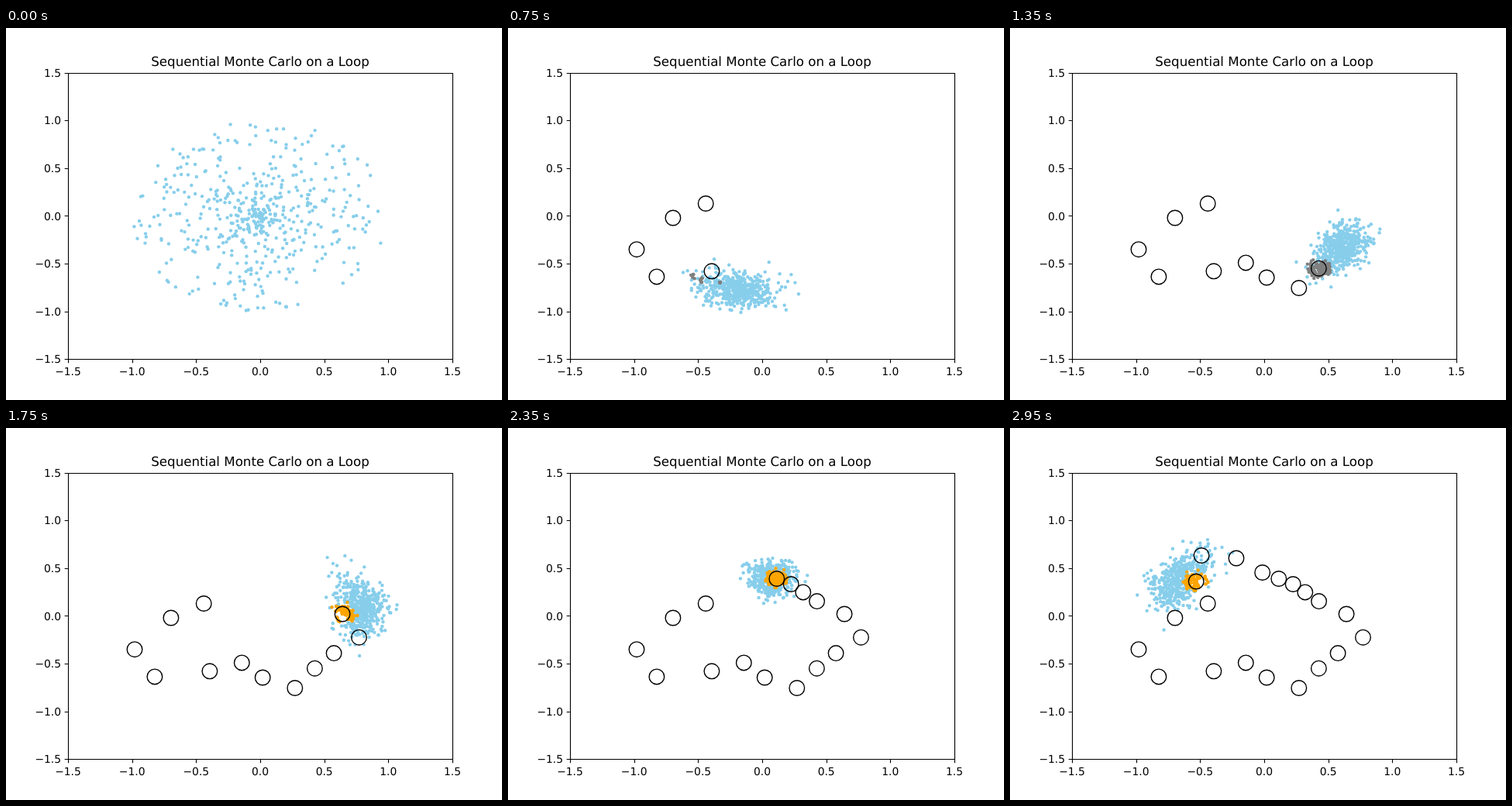
An HTML page with a canvas for the animation above (3000 ms loop, 640 px wide and 480 px high).

```html
<!DOCTYPE html>
<html lang="en">
<head>
<meta charset="utf-8">
<title>Sequential Monte Carlo on a Loop</title>
<style>
  html, body { margin: 0; width: 100%; height: 100%; overflow: hidden; background: #fff; }
  canvas, svg { position: absolute; left: 0; top: 0; width: 640px; height: 480px; }
  text {
    font-family: "DejaVu Sans", Verdana, sans-serif; font-size: 13.89px; fill: #000;
    text-rendering: geometricPrecision;
  }
  .title { font-size: 16.67px; }
  path { stroke: #000; stroke-width: 1.11; fill: none; }
</style>
</head>
<body>
<canvas id="plot" width="640" height="480"></canvas>
<svg id="axes" viewBox="0 0 640 480"></svg>
<script>
const FRAME_MS = 50, SUBFRAMES = 3, COUNT = 500;
const TURN = Math.PI / 8, ANGLE_NOISE = 0.2, RADIUS_NOISE = 0.088, SIGHT = 0.032;
const X0 = 328, Y0 = 242.4, SX = 496 / 3, SY = 369.6 / 3;

const toX = x => X0 + x * SX;
const toY = y => Y0 - y * SY;

// Observed positions along the loop, in pixels
const circles = [
  [255.2, 226.5], [212.9, 245], [166, 285.7], [191.9, 320.9], [262.9, 313.8],
  [304.3, 302.9], [331.2, 322], [372.8, 335.5], [398.4, 310.2], [423.1, 290.6],
  [455.5, 270.2], [434.1, 240], [398.6, 223.6], [380.8, 211.9], [365.2, 201.5],
  [346.8, 194.5], [325.7, 186.5], [292, 168], [247.1, 164.5], [240.2, 198]
];

let seed = 20471;
function random() {
  seed = (seed + 0x6D2B79F5) | 0;
  let v = Math.imul(seed ^ (seed >>> 15), 1 | seed);
  v = (v + Math.imul(v ^ (v >>> 7), 61 | v)) ^ v;
  return ((v ^ (v >>> 14)) >>> 0) / 4294967296;
}

function normal() {
  return Math.sqrt(-2 * Math.log(1 - random())) * Math.cos(2 * Math.PI * random());
}

const polar = (r, a) => [r * Math.cos(a), r * Math.sin(a)];

function predict([x, y]) {
  return polar(
    Math.hypot(x, y) + RADIUS_NOISE * normal(),
    Math.atan2(y, x) + TURN + ANGLE_NOISE * normal()
  );
}

// Systematic resampling weighted by closeness to the observation
function resample(points, [px, py]) {
  const ox = (px - X0) / SX, oy = (Y0 - py) / SY;
  const weights = points.map(([x, y]) =>
    Math.exp(-((x - ox) ** 2 + (y - oy) ** 2) / (2 * SIGHT * SIGHT)));
  const total = weights.reduce((a, b) => a + b, 0);
  const picked = [], offset = random();
  let i = 0, sum = weights[0];
  for (let n = 0; n < COUNT; n++) {
    const goal = (n + offset) / COUNT * total;
    while (sum < goal && i < COUNT - 1) sum += weights[++i];
    picked.push(points[i]);
  }
  return picked;
}

const clouds = [], chosen = [];
let cloud = Array.from({ length: COUNT }, () => polar(random(), 2 * Math.PI * random()));
for (const c of circles) {
  clouds.push(cloud);
  const kept = resample(cloud, c);
  chosen.push(kept);
  cloud = kept.map(predict);
}

const ctx = document.getElementById("plot").getContext("2d");

function dots(points, color) {
  ctx.fillStyle = color;
  for (const [x, y] of points) {
    ctx.beginPath();
    ctx.arc(toX(x), toY(y), 2.2, 0, 2 * Math.PI);
    ctx.fill();
  }
}

function draw(frame) {
  const step = Math.floor(frame / SUBFRAMES), sub = frame % SUBFRAMES;
  ctx.clearRect(0, 0, 640, 480);
  dots(clouds[step], "skyblue");
  if (sub === 2) dots(chosen[step], "orange");
  else if (step > 0) dots(chosen[step - 1], "gray");

  ctx.strokeStyle = "#000";
  ctx.lineWidth = 1.39;
  for (const [x, y] of circles.slice(0, step + (sub > 0 ? 1 : 0))) {
    ctx.beginPath();
    ctx.arc(x, y, 9.8, 0, 2 * Math.PI);
    ctx.stroke();
  }
}

function buildAxes() {
  const snap = v => Math.round(v) + 0.5;
  const label = (x, y, anchor, text, cls = "") =>
    `<text x="${x}" y="${Math.round(y)}" text-anchor="${anchor}" class="${cls}">${text}</text>`;
  let path = "M80.5 58.5H576.5V427.5H80.5Z", labels = "";
  for (let v = -1.5; v <= 1.5; v += 0.5) {
    const x = toX(v), y = toY(v);
    const text = v.toFixed(1).replace("-", "\u2212");
    path += `M${snap(x)} 427.5v4.86M80.5 ${snap(y)}h-4.86`;
    labels += label(x, 447.6, "middle", text) + label(71.1, y + 5.2, "end", text);
  }
  labels += label(X0, 49, "middle", "Sequential Monte Carlo on a Loop", "title");
  document.getElementById("axes").innerHTML = `<path d="${path}"/>${labels}`;
}

buildAxes();
draw(0);
const start = performance.now();
let shown = 0;
function tick() {
  const frame = Math.floor((performance.now() - start) / FRAME_MS) % (circles.length * SUBFRAMES);
  if (frame !== shown) draw(shown = frame);
  requestAnimationFrame(tick);
}
requestAnimationFrame(tick);
</script>
</body>
</html>
```
